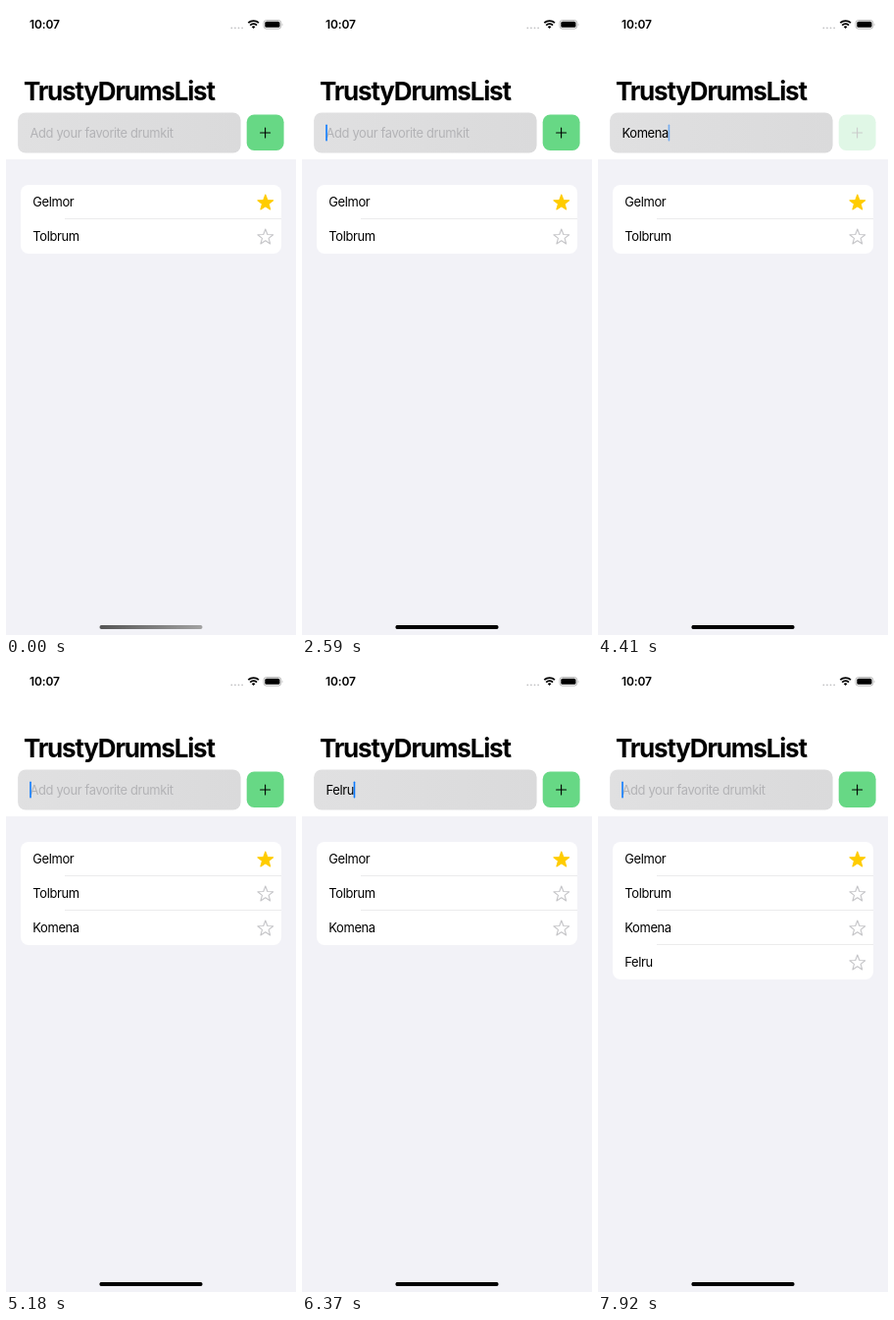
These frames come from a looping animation (296 px wide and 640 px high, 8 s). An HTML page:

```html
<!DOCTYPE html>
<html lang="en">
<head>
<meta charset="utf-8">
<title>Drum list</title>
<style>
  html, body { margin: 0; width: 100%; height: 100%; overflow: hidden; background: #fff; }
  svg { display: block; width: 296px; height: 640px; }
  text { font: 12.9px Inter, "Liberation Sans", sans-serif; letter-spacing: -.35px; white-space: pre; }
  .clock { font-size: 12px; font-weight: 600; letter-spacing: -.1px; }
  .title { font-size: 26px; font-weight: 700; letter-spacing: -1.2px; }
  .menu { font-size: 10.6px; fill: #fff; text-anchor: middle; letter-spacing: -.1px; }
</style>
</head>
<body>
<svg viewBox="0 0 296 640">
  <defs>
    <linearGradient id="dim"><stop stop-color="#555"/><stop offset="1" stop-color="#a2a2a2"/></linearGradient>
    <linearGradient id="field"><stop stop-color="#e0e0e1"/><stop offset="1" stop-color="#dadadb"/></linearGradient>
    <clipPath id="cardClip"><rect class="card" x="15" y="182" width="266" rx="8"/></clipPath>
  </defs>
  <rect width="296" height="640" fill="#fff"/>
  <rect y="156" width="296" height="484" fill="#f2f2f7"/>

  <text class="clock" x="24" y="23">10:07</text>
  <path d="M230.3 22.3h12" stroke="#c2c2c4" stroke-width="1.8" stroke-linecap="round" stroke-dasharray="0 3.6"/>
  <g fill="none" stroke="#000" stroke-width="1.8">
    <path d="M247.3 17.2a7.6 7.6 0 0 1 10.6 0M249.2 19.6a4.8 4.8 0 0 1 6.8 0"/>
    <path d="M250.8 21.2a2.6 2.6 0 0 1 3.6 0l-1.8 1.9z" fill="#000" stroke="none"/>
  </g>
  <rect x="263" y="14.5" width="17.8" height="8.6" rx="2.7" fill="none" stroke="#a6a6a6" stroke-width=".8"/>
  <rect x="264.3" y="15.8" width="15.2" height="6" rx="1.6"/>
  <path d="M281.8 17.4q1.4 1.4 0 2.8z" fill="#a6a6a6"/>

  <text class="title" x="18" y="96.4">TrustyDrumsList</text>
  <rect x="12.1" y="108.5" width="227.5" height="41" rx="8" fill="url(#field)"/>
  <text id="hint" x="24.5" y="133.6" fill="#b3b3b6">Add your favorite drumkit</text>
  <text id="entry" x="24.5" y="133.6"></text>
  <rect id="caret" y="120.5" width="1.6" height="17" rx=".8" fill="#0a7aff"/>
  <g id="button">
    <rect x="245.7" y="110.6" width="37.9" height="36.5" rx="7.6" fill="#67d885"/>
    <path d="M259.6 129h10M264.6 124v10" stroke="#000" stroke-width="1.1" stroke-linecap="round"/>
  </g>

  <rect class="card" x="15" y="182" width="266" rx="8" fill="#fff"/>
  <g id="rows" clip-path="url(#cardClip)"></g>

  <g id="menu">
    <path d="M13 79H56q6 0 6 6V101q0 6-6 6H32l-7 7-7-7H13q-6 0-6-6V85q0-6 6-6z" fill="#29292b"/>
    <text class="menu" x="34.5" y="97">Paste</text>
  </g>
  <rect x="95.5" y="630.1" width="105" height="3.8" rx="1.9" fill="url(#dim)"/>
  <rect id="homeBar" x="95.5" y="630.1" width="105" height="3.8" rx="1.9"/>
</svg>
<script>
const LOOP = 8000, ROW = 35;
const $ = id => document.getElementById(id);
const names = ['Gelmor', 'Tolbrum', 'Komena', 'Felru'];

// Each track lists [time, value]; the value holds until the next entry.
const entryTrack = [[0, ''], [2840, 'K'], [3020, 'Ko'], [3250, 'Kome'], [3420, 'Komena'], [4650, ''],
  [5690, 'F'], [5920, 'Fe'], [6040, 'Fel'], [6150, 'Felr'], [6260, 'Felru'], [7610, '']];
const caretTrack = [[0, 0], [1230, 1], [2020, .6], [2240, 0], [2590, 1], [3950, .85], [4090, 0],
  [4410, .5], [4540, 1], [6860, .7], [6980, .3], [7090, 0], [7270, .5], [7390, 1]];
const barTrack = [[0, 0], [1230, .5], [1360, 1]];
const menuTrack = [[0, 0], [5540, 1], [5690, .5], [5800, 0]];

const hold = (track, t) => track.findLast(([time]) => time <= t)[1];
const ramp = (t, from, to) => Math.min(1, Math.max(0, (t - from) / (to - from)));
const smooth = x => x * x * (3 - 2 * x);
const press = (t, down, up) => ramp(t, down, down + 130) - ramp(t, up, up + 300);

function star(cx, cy) {
  return Array.from({ length: 10 }, (_, i) => {
    const r = i % 2 ? 3.5 : 8.3, a = i * Math.PI / 5;
    return (cx + r * Math.sin(a)).toFixed(2) + ',' + (cy - r * Math.cos(a)).toFixed(2);
  }).join(' ');
}

$('rows').innerHTML = names.map((name, i) => {
  const y = 182 + ROW * i;
  const paint = i ? 'fill="none" stroke="#c5c5c8"' : 'fill="#fc0" stroke="#fc0"';
  const line = i ? `<path d="M60 ${y - .5}H281" stroke="#e6e6e8" stroke-width=".8"/>` : '';
  return `<g>${line}<text x="27.3" y="${y + 22.3}">${name}</text>
    <polygon points="${star(264.8, y + 18.3)}" ${paint} stroke-width="1.1" stroke-linejoin="round"/></g>`;
}).join('');
const rows = [...$('rows').children];
const cards = document.querySelectorAll('.card');

function draw(t) {
  const entry = hold(entryTrack, t);
  $('entry').textContent = entry;
  $('hint').style.opacity = entry ? 0 : 1;
  const width = entry ? $('entry').getComputedTextLength() : 0;
  $('caret').setAttribute('x', 24.2 + width);
  $('caret').style.opacity = hold(caretTrack, t);
  $('homeBar').style.opacity = hold(barTrack, t);
  $('menu').style.opacity = hold(menuTrack, t);
  $('button').style.opacity = 1 - .8 * (press(t, 4260, 4640) + press(t, 7250, 7600));

  const shown = [1, 1, smooth(ramp(t, 4600, 4950)), smooth(ramp(t, 7560, 7910))];
  rows.forEach((row, i) => row.style.opacity = shown[i]);
  const height = ROW * shown.reduce((a, b) => a + b);
  cards.forEach(card => card.setAttribute('height', height));
}

const start = performance.now();
function tick() {
  draw((performance.now() - start) % LOOP);
  requestAnimationFrame(tick);
}
tick();
</script>
</body>
</html>
```
